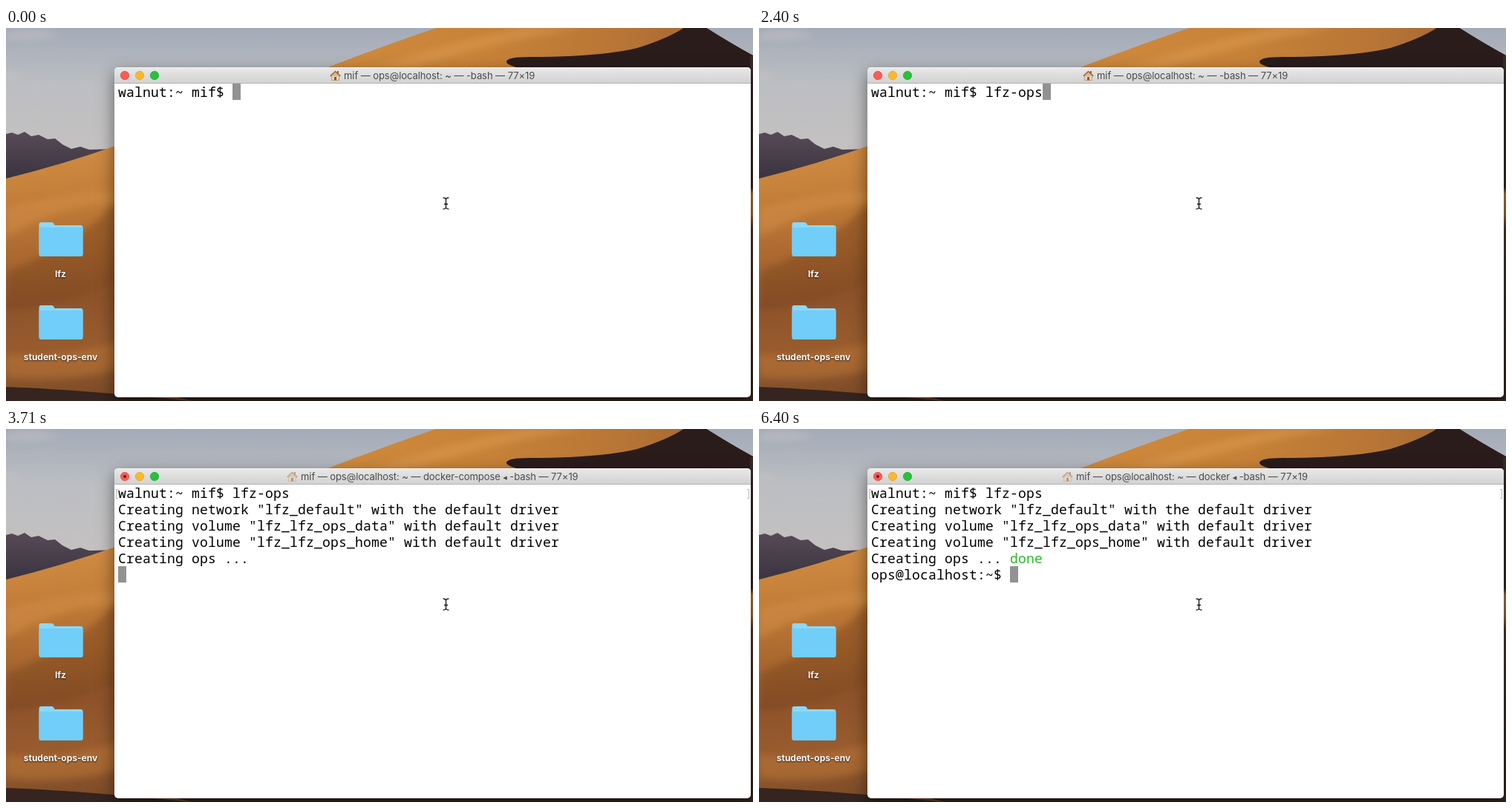
An HTML page for the animation above (8 s loop, 1006x503 px).

```html
<!DOCTYPE html>
<html lang="en">
<head>
<meta charset="utf-8">
<title>Terminal</title>
<style>
  html, body { margin: 0; width: 100%; height: 100%; overflow: hidden; }
  svg { display: block; }
  text { white-space: pre; }
  .mono { font: 500 18px "Noto Sans Mono", "DejaVu Sans Mono", monospace; letter-spacing: .2px; }
  .title { font: 13px Inter, Roboto, sans-serif; letter-spacing: -.07px; fill: #4b4b4b; }
  .small { font: 11px "DejaVu Sans", sans-serif; }
  .label { font: 700 12px Inter, Roboto, sans-serif; fill: #fff; text-anchor: middle;
           text-shadow: 0 1px 2px rgba(0, 0, 0, .8); }
  .window { filter: drop-shadow(0 8px 11px rgba(0, 0, 0, .5)); }
</style>
</head>
<body>
<svg width="1006" height="503" viewBox="0 0 1006 503">
  <defs>
    <linearGradient id="sky" x2="0" y2="1">
      <stop stop-color="#a3abb8"/><stop offset=".45" stop-color="#bcbec2"/><stop offset="1" stop-color="#c5c1c0"/>
    </linearGradient>
    <linearGradient id="hills" x2="0" y2="1">
      <stop stop-color="#574a56"/><stop offset=".5" stop-color="#3f3844"/><stop offset="1" stop-color="#2b2733"/>
    </linearGradient>
    <linearGradient id="ridge">
      <stop stop-color="#cf8a3e"/><stop offset=".35" stop-color="#c98338"/><stop offset=".7" stop-color="#b77536"/><stop offset="1" stop-color="#9a612f"/>
    </linearGradient>
    <linearGradient id="dune" gradientUnits="userSpaceOnUse" x1="40" y1="170" x2="70" y2="503">
      <stop stop-color="#cf8b42"/><stop offset=".2" stop-color="#c27c38"/><stop offset=".42" stop-color="#a9672f"/>
      <stop offset=".6" stop-color="#8e532b"/><stop offset=".82" stop-color="#9a5d2e"/><stop offset="1" stop-color="#7a4a28"/>
    </linearGradient>
    <linearGradient id="edge" x2="0" y2="1">
      <stop stop-color="#3a2826"/><stop offset=".38" stop-color="#3a2826"/><stop offset=".4" stop-color="#b5743a"/>
      <stop offset=".46" stop-color="#a4652f"/><stop offset=".5" stop-color="#553529"/><stop offset="1" stop-color="#35241f"/>
    </linearGradient>
    <linearGradient id="bar" x2="0" y2="1">
      <stop stop-color="#e9e9e9"/><stop offset="1" stop-color="#d1d1d1"/>
    </linearGradient>
    <filter id="soft" x="-30%" y="-30%" width="160%" height="160%"><feGaussianBlur stdDeviation="5"/></filter>
    <g id="folder">
      <path d="M.5 3q0-3 3-3h14q2 0 3 2l1 2h35q3 0 3 3v36H.5z" fill="#8bd8f8"/>
      <path d="M.5 7h59v37q0 2-2 2h-55q-2 0-2-2z" fill="#71cef8"/>
    </g>
  </defs>

  <!-- desert -->
  <rect width="1006" height="170" fill="url(#sky)"/>
  <path d="M0 58q12 0 22 9-12 4-22 2zM0 8q40-10 75 2-40 8-75 4z" fill="#c9c4c6" opacity=".5" filter="url(#soft)"/>
  <path d="M0 143l8-2 8 3 9-4 9 6 10-2 12 6 10-1 10 8 12 6 12-3 12 4 38-1v80H0z" fill="url(#hills)"/>
  <path d="M428 55Q500 27 582-1H942Q975 20 1006 37V60H428z" fill="url(#ridge)"/>
  <path d="M545 55Q640 22 780-1H700Q600 18 490 55z" fill="#dc9c51" opacity=".5" filter="url(#soft)"/>
  <path d="M674 45Q676 39 705 39Q800 39 850 27Q892 14 914-1H942Q975 20 1006 37V60H720Q672 52 674 45z" fill="#2b1c1c"/>
  <path d="M0 203Q80 183 150 158V503H0z" fill="url(#dune)"/>
  <path d="M0 243Q90 218 150 218V238Q80 235 0 282z" fill="#d3904a" opacity=".5" filter="url(#soft)"/>
  <path d="M150 235Q95 290 0 330V380Q90 370 150 345z" fill="#74431f" opacity=".4" filter="url(#soft)"/>
  <path d="M0 440Q70 446 150 424V460Q70 480 0 470z" fill="#b87538" opacity=".55" filter="url(#soft)"/>
  <path d="M146 490H1006V503H146z" fill="#35241f"/>
  <path d="M146 490H200L250 503H146z" fill="#7a4a28"/>
  <path d="M0 484Q90 487 250 503H0z" fill="#35241f"/>
  <path d="M1002 38h4v465h-4z" fill="url(#edge)"/>

  <use href="#folder" x="44" y="262"/>
  <text class="label" x="73.5" y="336">lfz</text>
  <use href="#folder" x="44" y="374"/>
  <text class="label" x="73.5" y="448">student-ops-env</text>

  <!-- window -->
  <rect class="window" x="146" y="53" width="857" height="445" rx="5" fill="#fff"/>
  <path d="M146 75V58q0-5 5-5H998q5 0 5 5V75z" fill="url(#bar)"/>
  <path d="M146 74.5H1003" stroke="#b4b4b4"/>
  <path d="M150 53.5H999" stroke="#f5f5f5"/>
  <g stroke-width=".7">
    <circle cx="160" cy="64" r="5.7" fill="#fc5b55" stroke="#df4542"/>
    <circle cx="180" cy="64" r="5.7" fill="#fab82c" stroke="#dda12c"/>
    <circle cx="200" cy="64" r="5.7" fill="#28c13b" stroke="#1fa62f"/>
  </g>
  <circle id="dot" cx="160" cy="64" r="2" fill="#6d0f0c"/>
  <g id="heading">
    <g id="house">
      <path d="M2.5 7h10v6.5h-10z" fill="#e6d6b8" stroke="#a98d68" stroke-width=".7"/>
      <path d="M10 1h2v4h-2z" fill="#a4573a"/>
      <path d="M.8 7.8L7.5 1.5l6.7 6.3" fill="#d9b98b" stroke="#a8643e" stroke-width="1.6"/>
      <path d="M6 9h3v4.5H6z" fill="#8a5836"/>
    </g>
    <text class="title" x="19" y="12">mif — ops@localhost: ~ — <tspan id="parent"></tspan><tspan id="arrow" class="small">◂</tspan><tspan id="shell"></tspan> — 77×19</text>
  </g>

  <!-- terminal -->
  <path id="marks" d="M151 81.5h-2.5v12h2.5M998 81.5h2.5v12h-2.5" fill="none" stroke="#b5b5b5"/>
  <rect id="cursor" width="11" height="22" fill="#929292"/>
  <g id="screen" class="mono"></g>
  <path d="M588.5 228.8q3.5 0 4 2 .5-2 4-2M588.5 244.2q3.5 0 4-2 .5 2 4 2M592.5 230v13M590 237.5h5" fill="none" stroke="#111" stroke-width="1.3"/>
</svg>
<script>
const LOOP = 8000, CELL = 11, ROW = 22, LEFT = 151, TOP = 75;
const PROMPT = "walnut:~ mif$ ", COMMAND = "lfz-ops";
const KEYS = [500, 730, 1030, 1330, 1570, 1810, 2400];
const ENTER = 2880, RUNNING = 2990, DONE = 5330, ATTACHED = 5860, READY = 6400;
const OUTPUT = [
  [3470, 'Creating network "lfz_default" with the default driver'],
  [3590, 'Creating volume "lfz_lfz_ops_data" with default driver'],
  [3590, 'Creating volume "lfz_lfz_ops_home" with default driver'],
  [3710, "Creating ops ... "],
];
const $ = id => document.getElementById(id);

function addText(row, col, fill = "#000") {
  const el = document.createElementNS("http://www.w3.org/2000/svg", "text");
  el.setAttribute("x", LEFT + col * CELL);
  el.setAttribute("y", TOP + row * ROW + 18);
  el.setAttribute("fill", fill);
  return $("screen").appendChild(el);
}

const rows = Array.from({ length: 6 }, (_, row) => addText(row, 0));
const status = addText(4, 17, "#25bc24");

function set(el, text) {
  if (el.textContent !== text) el.textContent = text;
}

function show(el, visible) {
  el.setAttribute("visibility", visible ? "visible" : "hidden");
}

function drawTitle(t) {
  const running = t >= RUNNING;
  const x = !running ? 436 : t < ATTACHED ? 378 : 408;
  $("heading").setAttribute("transform", `translate(${x} 57)`);
  $("house").setAttribute("opacity", running ? .5 : 1);
  set($("parent"), !running ? "" : t < ATTACHED ? "docker-compose " : "docker ");
  set($("arrow"), running ? "◂" : "");
  set($("shell"), running ? " -bash" : "-bash");
  show($("dot"), running);
}

function drawScreen(t) {
  const lines = [PROMPT + COMMAND.slice(0, KEYS.filter(k => t >= k).length)];
  if (t >= ENTER) {
    for (const [start, text] of OUTPUT) if (t >= start) lines.push(text);
    lines.push(t >= READY ? "ops@localhost:~$ " : "");
  }
  rows.forEach((el, i) => set(el, lines[i] || ""));
  set(status, t >= DONE ? "done" : "");
  show($("marks"), t >= ENTER);
  const last = lines.length - 1;
  $("cursor").setAttribute("x", LEFT + lines[last].length * CELL);
  $("cursor").setAttribute("y", TOP + last * ROW);
}

const begin = performance.now();
function frame() {
  const t = (performance.now() - begin) % LOOP;
  drawTitle(t);
  drawScreen(t);
  requestAnimationFrame(frame);
}
frame();
</script>
</body>
</html>
```
